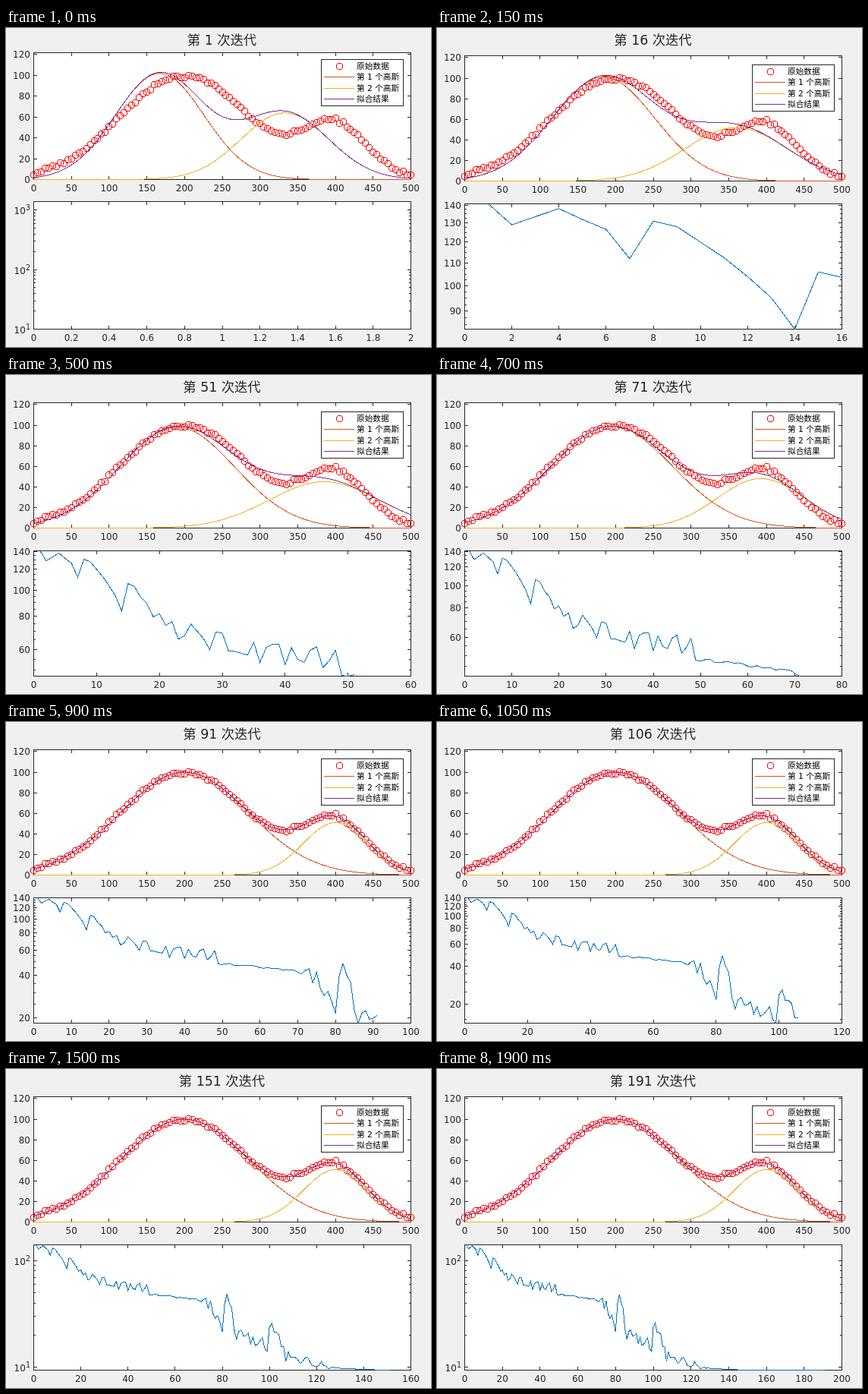
Recreate the animation shown at these times as an HTML page. Size 560 by 420 pixels, loop 1950 ms.

```html
<!DOCTYPE html>
<html lang="zh">
<head>
<meta charset="utf-8">
<title>高斯拟合迭代</title>
<style>
  html, body { margin: 0; width: 100%; height: 100%; overflow: hidden; background: #f0f0f0; }
  svg { display: block; width: 560px; height: 420px; font: 12px "DejaVu Sans", "Noto Sans CJK SC", "Noto Sans CJK", sans-serif; fill: #262626; }
  path, rect { shape-rendering: crispEdges; stroke-width: 1; fill: none; }
  .title { font-size: 17.33px; }
  .legend { font-size: 10.67px; fill: #000; }
  .power { font-size: 9.6px; }
</style>
</head>
<body>
<svg id="stage" viewBox="0 0 560 420"></svg>
<script>
const STEP = 50, STEPS = 39, LAST = 191;
const LEFT = 36, RIGHT = 533, BOTTOM = 396, TICK = 5, MINOR = 3;
const INK = '#262626', RED = '#ff0000', ORANGE = '#d95319', YELLOW = '#edb120',
      PURPLE = '#7e2f8e', BLUE = '#0072bd';

function seeded(seed) {
  return () => (seed = (seed * 16807) % 2147483647) / 2147483647;
}

const range = (from, to, step) => {
  const out = [];
  for (let i = Math.ceil(from / step - 1e-9); i * step <= to + 1e-9; i++) out.push(+(i * step).toFixed(2));
  return out;
};

// Interpolates rows of [time, ...values] and holds the last row.
function between(keys, t) {
  const i = keys.findIndex(k => k[0] >= t);
  if (i < 0) return keys[keys.length - 1].slice(1);
  const b = keys[i], a = keys[Math.max(0, i - 1)];
  const f = a === b ? 0 : (t - a[0]) / (b[0] - a[0]);
  return a.map((v, j) => v + (b[j] - v) * f).slice(1);
}

const gauss = (x, h, c, w) => h * Math.exp(-(((x - c) / w) ** 2));

// iteration, then height, centre and width of each Gaussian
const fits = [
  [1, 102, 167, 83, 64, 333, 82],
  [31, 100, 201, 109, 40, 387, 109],
  [51, 98, 190, 108, 45, 385, 103],
  [91, 100, 200, 120, 51, 400, 60]
];
const goal = fits[fits.length - 1].slice(1);

// Measured points scatter around the goal with a bell-shaped noise.
const scatter = seeded(77);
const samples = range(0, 500, 5).map(x => [
  x,
  gauss(x, ...goal.slice(0, 3)) + gauss(x, ...goal.slice(3)) + (scatter() + scatter() + scatter() - 1.5) * 1.8
]);

// The error follows these turning points, with random upward spikes between them.
const turns = [
  [1, 140.8], [2, 129], [4, 138], [7, 112], [8, 131], [14, 83.5], [15, 106], [19, 79.5],
  [23, 65.5], [28, 59.9], [36, 53.5], [49, 47.8], [70, 42], [80, 21.5], [81, 39.3], [86, 18.3],
  [99, 14], [100, 23.6], [107, 11.3], [125, 9.6], [150, 9.35]
];
function spike(n) {
  if (n < 50) return n < 20 ? 0.05 : 0.25;
  if (n < 72) return 0.03;
  return n < 125 ? 0.5 * Math.exp((72 - n) / 50) : 0.06 * Math.exp((125 - n) / 10);
}
const jump = seeded(41);
const errors = range(1, LAST, 1).map(n => {
  const isTurn = turns.some(t => t[0] === n);
  return between(turns, n)[0] * (1 + (isTurn ? 0 : spike(n) * jump()));
});

const px = v => Math.floor(v) + 0.5;
const path = (d, color) => `<path d="${d}" stroke="${color}"/>`;
const line = (pts, color) => path('M' + pts.map(p => p[0].toFixed(2) + ' ' + p[1].toFixed(2)).join('L'), color);
const ring = (x, y) => path(`M${px(x) - 4} ${px(y) - 2}l2-2h4l2 2v4l-2 2h-4l-2-2z`, RED);
const text = (x, y, s, anchor = 'middle', cls = '') =>
  `<text x="${x}" y="${y}" text-anchor="${anchor}" class="${cls}">${s}</text>`;
const box = (x, y, w, h) =>
  `<rect x="${x + 0.5}" y="${y + 0.5}" width="${w}" height="${h}" stroke="${INK}" style="fill:#fff"/>`;

const xTick = (x, top, bottom) => `M${px(x)} ${bottom + 1}v${-TICK}M${px(x)} ${top}v${TICK}`;
const yTick = (y, len) => `M${LEFT} ${px(y)}h${len}M${RIGHT + 1} ${px(y)}h${-len}`;
const yLabel = (y, s) => text(32, Math.floor(y) + 4.5, s, 'end');

function xAxis(max, step, top, bottom) {
  let ticks = '', labels = '';
  for (const v of range(0, max, step)) {
    const x = LEFT + 0.5 + v / max * (RIGHT - LEFT);
    ticks += xTick(x, top, bottom);
    labels += text(x.toFixed(1), bottom + 16, v);
  }
  return path(ticks, INK) + labels;
}

function legend(top) {
  const rows = [['原始数据', RED], ['第 1 个高斯', ORANGE], ['第 2 个高斯', YELLOW], ['拟合结果', PURPLE]];
  return box(415, top, 108, 61) + rows.map(([name, color], i) => {
    const y = Math.round(top + 9 + i * 14.4);
    const mark = i ? path(`M419 ${y + 0.5}h40`, color) : ring(439, y);
    return mark + text(462, y + 4, name, 'start', 'legend');
  }).join('');
}

function fitPlot(n) {
  const [top, bottom, legendTop] = n === 1 ? [32, 199, 41] : [36, 201, 48];
  const X = x => LEFT + 0.5 + x / 500 * (RIGHT - LEFT);
  const Y = y => bottom + 0.5 - y / 121.8 * (bottom - top);
  const fit = between(fits, n);
  const first = x => gauss(x, ...fit.slice(0, 3));
  const second = x => gauss(x, ...fit.slice(3));
  const curve = (f, color) => line(range(0, 500, 5).map(x => [X(x), Y(f(x))]), color);

  let out = box(LEFT, top, RIGHT - LEFT, bottom - top) + xAxis(500, 50, top, bottom);
  let ticks = '';
  for (const v of range(0, 120, 20)) {
    ticks += yTick(Y(v), TICK);
    out += yLabel(Y(v), v);
  }
  out += path(ticks, INK) + samples.map(([x, y]) => ring(X(x), Y(y))).join('');
  out += curve(first, ORANGE) + curve(second, YELLOW) + curve(x => first(x) + second(x), PURPLE);
  return out + legend(legendTop);
}

function errorPlot(n) {
  const single = n === 1;
  const seen = errors.slice(0, n);
  const top = single ? 228 : 231;
  const [low, high] = single ? [10, 1400] : [Math.min(...seen), Math.max(...seen)];
  const xStep = single ? 0.2 : [1, 2, 5, 10, 20].find(s => n <= s * 10);
  const xMax = single ? 2 : Math.ceil(n / xStep) * xStep;
  const X = i => LEFT + 0.5 + i / xMax * (RIGHT - LEFT);
  const Y = v => BOTTOM + 0.5 - Math.log(v / low) / Math.log(high / low) * (BOTTOM - top);

  let out = box(LEFT, top, RIGHT - LEFT, BOTTOM - top) + xAxis(xMax, xStep, top, BOTTOM);
  let ticks = '';
  if (low <= 10) {
    for (let e = 0; e < 4; e++) {
      for (const v of range(10 ** e, 9 * 10 ** e, 10 ** e)) {
        if (v < low || v > high) continue;
        const major = v === 10 ** e;
        ticks += yTick(Y(v), major ? TICK : MINOR);
        if (major) out += yLabel(Y(v) + 1, `10<tspan class="power" dy="-5">${e}</tspan>`);
      }
    }
  } else {
    const step = [2, 5, 10, 20].find(s => (high - low) / s <= 6.5);
    for (const v of range(low, high, step / 4)) ticks += yTick(Y(v), MINOR);
    for (const v of range(low, high, step)) {
      ticks += yTick(Y(v), TICK);
      out += yLabel(Y(v), v);
    }
  }
  out += path(ticks, INK);
  return single ? out : out + line(seen.map((v, i) => [X(i + 1), Y(v)]), BLUE);
}

const stage = document.getElementById('stage');
const start = performance.now();
let shown = -1;

function draw() {
  const k = Math.floor((performance.now() - start) / STEP) % STEPS;
  if (k !== shown) {
    shown = k;
    const n = 1 + 5 * k;
    stage.innerHTML = text(284.5, 22, `第 ${n} 次迭代`, 'middle', 'title') + fitPlot(n) + errorPlot(n);
  }
  requestAnimationFrame(draw);
}
draw();
</script>
</body>
</html>
```
